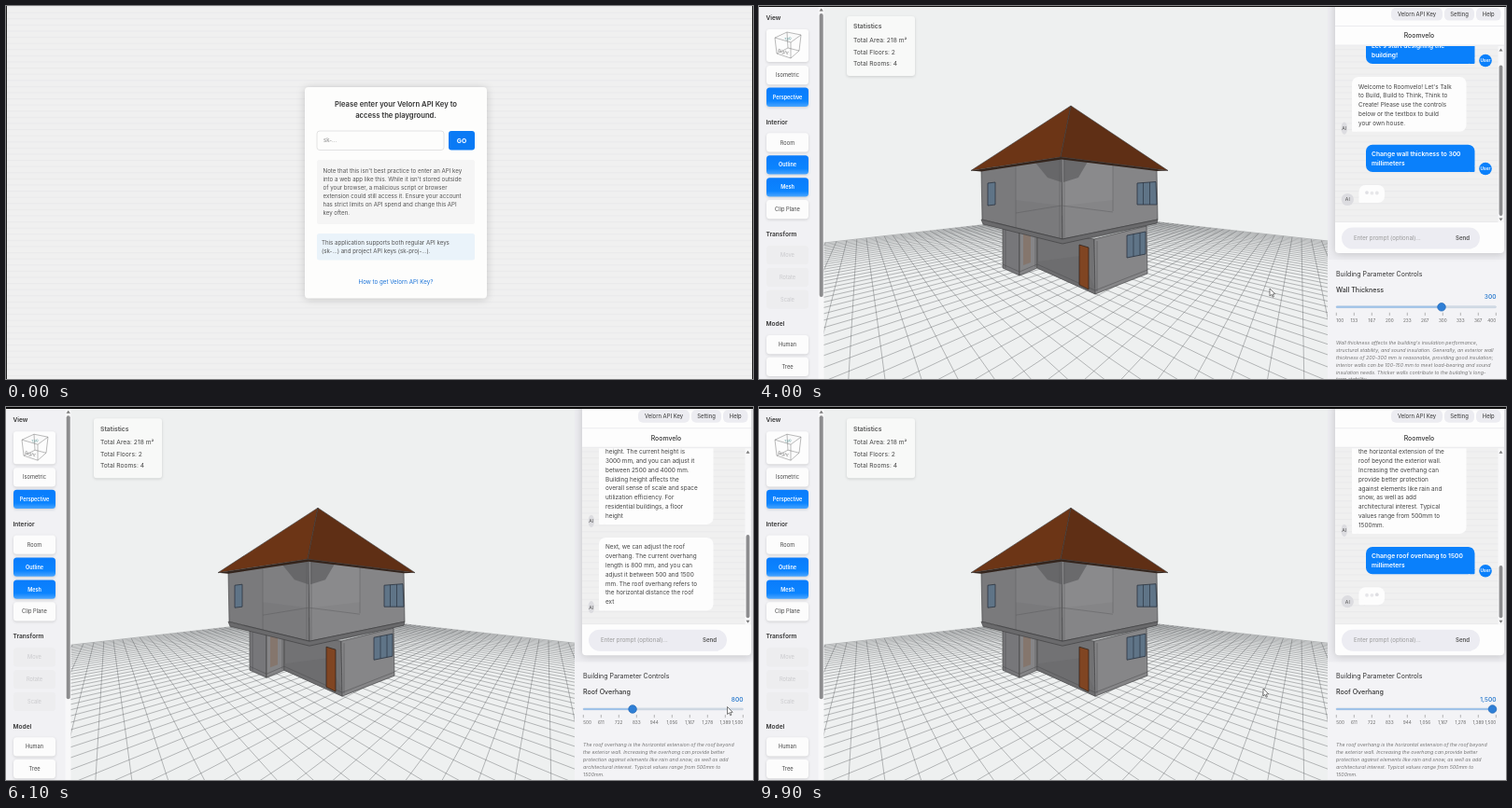
An HTML page that plays this animation: 800x400 px, repeating every 10 s.

```html
<!DOCTYPE html>
<html lang="en">
<head>
<meta charset="utf-8">
<title>Building design chat</title>
<style>
html, body { margin: 0; width: 100%; height: 100%; overflow: hidden; background: #eee; }
svg { display: block; width: 800px; height: 400px; font-family: Inter, "Open Sans", sans-serif; }
text { white-space: pre; }
.soft { filter: drop-shadow(0 1px 1.5px rgba(0, 0, 0, .14)); }
.card { filter: drop-shadow(0 1px 4px rgba(0, 0, 0, .18)); }
</style>
</head>
<body>
<svg id="stage" viewBox="0 0 800 400" xmlns="http://www.w3.org/2000/svg">
  <defs>
    <pattern id="stripes" width="8" height="6.6" patternUnits="userSpaceOnUse">
      <rect width="8" height="6.6" fill="#f0f0f0"/><rect width="8" height="1" fill="#eaeaeb"/>
    </pattern>
    <linearGradient id="blue" x2="0" y2="1">
      <stop stop-color="#0a7cfb"/><stop offset=".7" stop-color="#0b84ff"/><stop offset="1" stop-color="#4aa5ff"/>
    </linearGradient>
    <clipPath id="viewClip"><rect x="69" y="-2" width="540" height="404"/></clipPath>
    <clipPath id="chatClip"><rect x="617" y="43" width="181" height="189"/></clipPath>
  </defs>
  <g id="login"></g>
  <g id="app"><g id="fixed"></g><g id="chat" clip-path="url(#chatClip)"></g><g id="params"></g></g>
  <g id="frame"></g>
  <g id="cursor"><path d="M0 0V8L1.9 6.4L3.2 9.2L4.4 8.7L3.2 6L5.7 5.8Z" fill="#fff" stroke="#444" stroke-width=".7"/></g>
</svg>
<script>
const LOOP = 10000, STEP = 100, APP_AT = 400, CUT = 5600;
const BRAND = 'Velorn', APP_NAME = 'Roomvelo';
const $ = id => document.getElementById(id);

const rect = (x, y, w, h, r, fill, more = '') =>
  `<rect x="${x}" y="${y}" width="${w}" height="${h}" rx="${r}" fill="${fill}" ${more}/>`;
const poly = (pts, fill, more = '') => `<polygon points="${pts}" fill="${fill}" ${more}/>`;
const path = (d, stroke, width, more = '') =>
  `<path d="${d}" fill="none" stroke="${stroke}" stroke-width="${width}" ${more}/>`;
// y is the vertical middle of the line
const text = (x, y, str, size, fill = '#444', weight = 400, anchor = 'start', more = '') =>
  `<text x="${x}" y="${y + size * .36}" font-size="${size}" fill="${fill}" font-weight="${weight}" text-anchor="${anchor}" ${more}>${str}</text>`;
const lines = (x, y, gap, str, ...style) =>
  str.split('|').map((s, i) => text(x, y + i * gap, s, ...style)).join('');

function loginView() {
  return rect(0, 0, 800, 400, 0, 'url(#stripes)') +
    rect(320, 87, 195, 226.5, 4, '#fdfdfc', 'class="card"') +
    lines(417.5, 105.5, 12, `Please enter your ${BRAND} API Key to|access the playground.`, 7.7, '#333', 600, 'middle') +
    rect(333, 134, 136, 20.5, 3, '#fdfdfc', 'stroke="#dcdcdc" stroke-width=".8"') +
    text(340, 144, 'sk-...', 6, '#888') +
    rect(474, 134, 28, 20.5, 3, '#0a7af5') +
    text(488, 144.5, 'GO', 6.8, '#fff', 700, 'middle') +
    rect(333, 165, 169, 69, 2.5, '#f5f5f5') +
    lines(339.5, 176.5, 9.1, "Note that this isn't best practice to enter an API key|into a web app like this. While it isn't stored outside|of your browser, a malicious script or browser|extension could still access it. Ensure your account|has strict limits on API spend and change this API|key often.", 6.15, '#555') +
    rect(333, 244, 169, 28.5, 2.5, '#eaf3fa') +
    lines(338, 254, 9.2, 'This application supports both regular API keys|(sk-...) and project API keys (sk-proj-...).', 6.15, '#555') +
    text(417.5, 296, `How to get ${BRAND} API Key?`, 6.2, '#1a73d8', 400, 'middle');
}

function grid() {
  // floor lines run from the far edges away from two vanishing points
  const far = [346, 222.6], vpL = [108, 196], vpR = [580, 196], size = .0108;
  const at = (u, v) => far.map((c, i) => ((c - u * vpL[i] - v * vpR[i]) / (1 - u - v)).toFixed(1));
  let d = '';
  for (let k = 0; k < .95; k += size)
    d += `M${at(k, 0)}L${at(k, .97 - k)}M${at(0, k)}L${at(.97 - k, k)}`;
  return path(d, '#4c4f52', .5, 'opacity=".75"');
}

function house() {
  const edge = 'stroke="#3a3a3c" stroke-width=".6"', glass = '#5f7487', pane = 'stroke="#2b3440" stroke-width=".8"';
  return poly('261,238 279,242 279,289 261,281', '#77777a', edge) +
    poly('279,242 298,240 298,281 279,289', '#858587', edge) +
    poly('298,240 359,250 360,309 298,281', '#727274', edge) +
    poly('359,250 415,236 416,287 360,309', '#868688', edge) +
    poly('283,243 291,245 291,275 283,278', '#85766d') +
    poly('298,274 344,268 360,303 360,309 298,281', '#69696b', 'opacity=".5"') +
    path('M261 277L279 285L298 277L360 305L416 283M264 240V281M296 243V280M362 252V306', '#4a4a4c', .5) +
    poly('343,256 353,259 353,304 343,299', '#804522', 'stroke="#33251c" stroke-width=".8"') +
    poly('394,246 414,242 414,266 394,270', glass, pane) +
    path('M401 244.6V268.6M408 243.2V267.2', '#2b3440', .7) +
    poly('238,176 324,162 325,250 239,229', '#7a7a7c', edge) +
    poly('324,162 426,175 427,229 325,250', '#858587', edge) +
    poly('275,170 324,163 324,214 275,208', '#838385', 'opacity=".6"') +
    poly('326,163 379,170 379,208 326,214', '#909092', 'opacity=".45"') +
    poly('296,168 324,163 324,189 309,184', '#5f5f61', 'opacity=".75"') +
    poly('326,163 352,167 342,184 326,189', '#5f5f61', 'opacity=".75"') +
    path('M275 171V238M379 170V220M275 222L324 214L379 221M322 164V249M327 164V249', '#555557', .5, 'opacity=".8"') +
    poly('238,229 325,250 427,229 426,233 325,255 240,234', '#6a6a6c', edge) +
    poly('245,190 253,189 253,213 245,214', glass, pane) +
    poly('405,190 425,188.5 426,213 405,213', glass, pane) +
    path('M411.5 189.5V213M418.5 189V213', '#2b3440', .7) +
    poly('227,176.5 323,162 438,176.5 426,177 324,164.5 238,177.5', '#33241c') +
    poly('334,107 227,176.5 323,162', '#6c3516', edge) +
    poly('334,107 323,162 438,176.5', '#5f2f15', edge);
}

function cube() {
  return rect(8, 25, 45, 35, 3, '#fdfdfd', 'class="soft"') +
    poly('17,34 30,28 45,31 34,39', '#fafafa') +
    path('M17 34L30 28L45 31L34 39ZM17 34L19 51L34 56L34 39M34 56L43 48L45 31M19 51L31 45L43 48M31 45L30 28', '#777', .5) +
    text(26, 49, 'Right', 5, '#888', 400, 'middle', 'transform="rotate(14 26 49)"') +
    text(31, 35, 'Top', 4.2, '#5c9a9c', 400, 'middle', 'transform="rotate(-18 31 35)"');
}

function sidebar() {
  const button = (y, label, kind) => {
    const on = kind === 1, off = kind === 2;
    return rect(8, y, 45, 20.3, 3.5, on ? 'url(#blue)' : off ? '#ededef' : '#fcfcfc', off ? '' : 'class="soft"') +
      text(30.5, y + 10.2, label, on ? 5.5 : 5.7, on ? '#fff' : off ? '#c9c9cc' : '#444', on ? 600 : 400, 'middle');
  };
  const head = (y, label) => text(7.5, y, label, 6.6, '#333', 600);
  return rect(0, -2, 64, 404, 0, '#f1f1f4') + rect(63.5, -2, 6, 404, 0, '#f8f8f9') +
    poly('64.5,5.5 66.7,2.5 68.9,5.5', '#777') + rect(64.7, 8, 4, 304, 2, '#8c8c8e') +
    head(12.5, 'View') + cube() + button(64, 'Isometric') + button(87.6, 'Perspective', 1) +
    head(124.5, 'Interior') + button(136.3, 'Room') + button(160.2, 'Outline', 1) +
    button(184.2, 'Mesh', 1) + button(208, 'Clip Plane') +
    head(244.5, 'Transform') + button(257, 'Move', 2) + button(280.8, 'Rotate', 2) + button(304.5, 'Scale', 2) +
    head(341, 'Model') + button(353, 'Human') + button(376.8, 'Tree');
}

function fixedView() {
  const pill = (x, w, label) => rect(x, 2, w, 13.6, 5, '#ececf1') + text(x + w / 2, 8.8, label, 5.9, '#333', 400, 'middle');
  return rect(0, -2, 800, 404, 0, '#eef0f0') +
    `<g clip-path="url(#viewClip)">${grid()}${house()}</g>` + sidebar() +
    rect(94, 11, 73, 64, 3, '#f8f9f8', 'class="soft"') +
    text(101, 22, 'Statistics', 6.8, '#555', 600) +
    lines(101, 36.7, 12.5, 'Total Area: 218 m²|Total Floors: 2|Total Rooms: 4', 6.7, '#444') +
    rect(609, -2, 191, 404, 0, '#ededf1') + rect(609, 272, 191, 130, 0, '#f3f3f6') +
    rect(617, -6, 181, 271, 4, '#fdfdfd', 'class="card"') +
    rect(617, 42, 181, 190, 0, 'url(#stripes)') +
    path('M617 21.5H798M617 42H798', '#e6e6ea', .7) +
    pill(677, 55, BRAND + ' API Key') + pill(734, 32, 'Setting') + pill(768, 26.5, 'Help') +
    text(707, 32, APP_NAME, 6.9, '#333', 500, 'middle') +
    rect(624, 237.5, 148, 23, 11.5, '#ececf2') +
    text(637, 249, 'Enter prompt (optional)...', 6.1, '#999') + text(746, 249, 'Send', 6.1, '#555', 600);
}

const WELCOME = `Welcome to ${APP_NAME}! Let's Talk|to Build, Build to Think, Think to|Create! Please use the controls|below or the textbox to build|your own house.`;
const CEILING_START = 'Next, we can adjust the|ceiling height. The current|height is 3000 mm, and you can|adjust it between 2500';
const CEILING = 'Next, we can adjust the ceiling|height. The current height is|3000 mm, and you can adjust it|between 2500 and 4000 mm.|Building height affects the|overall sense of scale and space|utilization efficiency. For|residential buildings, a floor|height';
const ROOF = 'Next, we can adjust the roof|overhang. The current overhang|length is 800 mm, and you can|adjust it between 500 and 1500|mm. The roof overhang refers to|the horizontal distance the roof|extends beyond the exterior|wall. In rainy or snowy areas,|larger overhangs (600-900mm)|are more common, while|temperate regions are suitable|for medium overhangs (300-|600mm). The roof overhang is|the horizontal extension of the|roof beyond the exterior wall.|Increasing the overhang can|provide better protection|against elements like rain and|snow, as well as add|architectural interest. Typical|values range from 500mm to|1500mm.';

function messages(t) {
  const list = [], user = s => list.push({ user: true, str: s });
  const ai = (s, n = s.length) => list.push(n > 0 ? { str: s.slice(0, n) } : { dots: true });
  user("Let's start designing the|building!");
  ai(WELCOME, Math.round((t - 800) / 7.5));
  if (t >= 2300) {
    user('Change wall thickness to 300|millimeters');
    if (t < CUT) ai(CEILING_START, Math.round((t - 5065) / 7.5));
  }
  if (t >= CUT) {
    ai(CEILING);
    ai(ROOF, Math.round(189 + (t - 6100) * 307 / 2200));
  }
  if (t >= 7000) {
    user('Change roof overhang to 1500|millimeters');
    ai('');
  }
  return list;
}

const ROW = 9.8;
function bubble(m, y, bar, t) {
  const bottom = y + m.h, mid = y + 10.2;
  if (m.user) {
    const right = bar ? 766.5 : 772;
    return rect(650, y, right - 650, m.h, 7, '#0a80fb') + rect(right - 6, bottom - 6, 6, 6, 1, '#0a80fb') +
      lines(656, mid, ROW, m.str, 6.7, '#fff', 600) +
      `<circle cx="${right + 11.5}" cy="${bottom - 3.5}" r="6.8" fill="#0a80fb"/>` +
      text(right + 11.5, bottom - 3.5, 'User', 4.9, '#fff', 600, 'middle');
  }
  const wide = m.n > 2, x = wide ? 635 : 642.5, w = m.dots ? 27.5 : 757.5 - x, ax = wide ? 626.8 : 630.3;
  let out = rect(x, y, w, m.h, 7, '#fdfdfd') + rect(x, bottom - 6, 6, 6, 1, '#fdfdfd') +
    `<ellipse cx="${ax}" cy="${bottom - 3.5}" rx="${wide ? 3.3 : 6.6}" ry="6.6" fill="#dcdce0"/>` +
    text(ax, bottom - 3.5, 'AI', 5.2, '#555', 400, 'middle');
  if (!m.dots) return out + lines(x + 7, mid, ROW, m.str, 6.4, '#444');
  for (let i = 0; i < 3; i++) {
    const wave = Math.sin(t / 160 - i * 1.1);
    out += `<circle cx="${651 + i * 5.4}" cy="${y + 8 - wave * .7}" r="1.9" fill="#d4d4d9" opacity="${.75 + wave * .25}"/>`;
  }
  return out;
}

function chatView(t) {
  const list = messages(t);
  let y = 49.5;
  for (const m of list) {
    m.n = m.dots ? 0 : m.str.split('|').length;
    m.h = m.dots ? 19 : m.n * ROW + 9.7;
    m.y = y;
    y += m.h + 14;
  }
  const last = list[list.length - 1], end = y - 14;
  const limit = last.dots ? 211 : last.n < 3 ? 220 : 217;
  const scroll = Math.max(0, end - limit);
  let out = list.filter(m => m.y + m.h - scroll > 35).map(m => bubble(m, m.y - scroll, scroll > 0, t)).join('');
  if (scroll) {
    const h = 181 * 188 / (end - 17);
    out += rect(791.5, 43, 6, 189, 0, '#f8f8f9') + poly('792.5,48.5 794.5,45.5 796.5,48.5', '#777') +
      poly('792.5,227.5 794.5,230.5 796.5,227.5', '#777') + rect(792.6, 225 - h, 3.8, h, 1.9, '#8c8c8e');
  }
  return out;
}

// piecewise linear path through [time, ...values]
function track(keys, t) {
  const i = keys.findIndex(k => k[0] > t);
  if (i < 1) return (i ? keys[keys.length - 1] : keys[0]).slice(1);
  const a = keys[i - 1], b = keys[i], f = (t - a[0]) / (b[0] - a[0]);
  return a.slice(1).map((v, j) => v + (b[j + 1] - v) * f);
}

const WALL = { name: 'Wall Thickness', min: 100, max: 400, keys: [[2000, 200], [2200, 300]],
  note: "Wall thickness affects the building's insulation performance,|structural stability, and sound insulation. Generally, an exterior wall|thickness of 200-300 mm is reasonable, providing good insulation;|interior walls can be 100-150 mm to meet load-bearing and sound|insulation needs. Thicker walls contribute to the building's long-|term stability." };
const HEIGHT = { name: 'Ceiling Height', min: 2500, max: 4000, keys: [[0, 3000]],
  note: 'Building height affects the overall sense of scale and space|utilization efficiency.' };
const OVERHANG = { name: 'Roof Overhang', min: 500, max: 1500, keys: [[6300, 800], [6500, 1500]],
  note: 'The roof overhang is the horizontal extension of the roof beyond|the exterior wall. Increasing the overhang can provide better|protection against elements like rain and snow, as well as add|architectural interest. Typical values range from 500mm to|1500mm.' };

function paramsView(t) {
  const p = t < 5500 ? WALL : t < CUT ? HEIGHT : OVERHANG;
  const value = Math.round(track(p.keys, t)[0]), num = n => Math.round(n).toLocaleString('en-US');
  const x = 622 + 163.5 * (value - p.min) / (p.max - p.min);
  let out = text(618, 287.3, 'Building Parameter Controls', 7, '#333') + text(618, 304.7, p.name, 7.1, '#333', 500) +
    text(789.5, 312, num(value), 6.6, '#2376cc', 500, 'end') +
    rect(618, 321.7, 171.5, 2, 1, '#d3dbe4', 'stroke="#b3c4d6" stroke-width=".4"') +
    rect(618, 321.7, x - 618, 2, 1, '#9fc2e8');
  for (let i = 0; i < 10; i++) {
    const at = i / 9, tx = 618.3 + 171 * at;
    out += path(`M${tx} 328.8V332`, '#888', .6) +
      text(tx, 337, num(p.min + (p.max - p.min) * at), 4.7, '#666', 400, i ? i < 9 ? 'middle' : 'end' : 'start');
  }
  return out + `<circle cx="${x}" cy="322.8" r="4.3" fill="#2f7fd6" stroke="#1f66b5" stroke-width=".7"/>` +
    lines(618, 361.2, 7.85, p.note, 5.3, '#777', 400, 'start', 'font-style="italic"');
}

const POINTER = [[400, 488, 146], [700, 484.5, 148], [1500, 484.5, 148], [1900, 676, 322], [2000, 676, 322],
  [2200, 731, 322], [2500, 547, 303], [5300, 547, 303], [6100, 772.5, 321.5], [6300, 785, 323],
  [6500, 785, 323], [6900, 539, 304.5], [8300, 539, 304.5], [9900, 540, 302]];

$('login').innerHTML = loginView();
$('fixed').innerHTML = fixedView();

function render(t) {
  const app = t >= APP_AT, late = t >= CUT;
  $('login').style.display = app ? 'none' : '';
  $('app').style.display = $('cursor').style.display = app ? '' : 'none';
  $('frame').innerHTML = app ? rect(0, 0, 800, late ? 2 : 1, 0, '#0a0a0a') :
    rect(0, 0, 1, 400, 0, '#222') + rect(799, 0, 1, 400, 0, '#222');
  if (!app) return;
  $('app').setAttribute('transform', `translate(0 ${late ? 1.2 : 0})`);
  $('chat').innerHTML = chatView(t);
  $('params').innerHTML = paramsView(t);
  $('cursor').setAttribute('transform', `translate(${track(POINTER, t)})`);
}

const start = performance.now();
let shown = -1;
function tick() {
  const t = Math.floor(((performance.now() - start) % LOOP) / STEP) * STEP;
  if (t !== shown) render(shown = t);
  requestAnimationFrame(tick);
}
tick();
</script>
</body>
</html>
```
